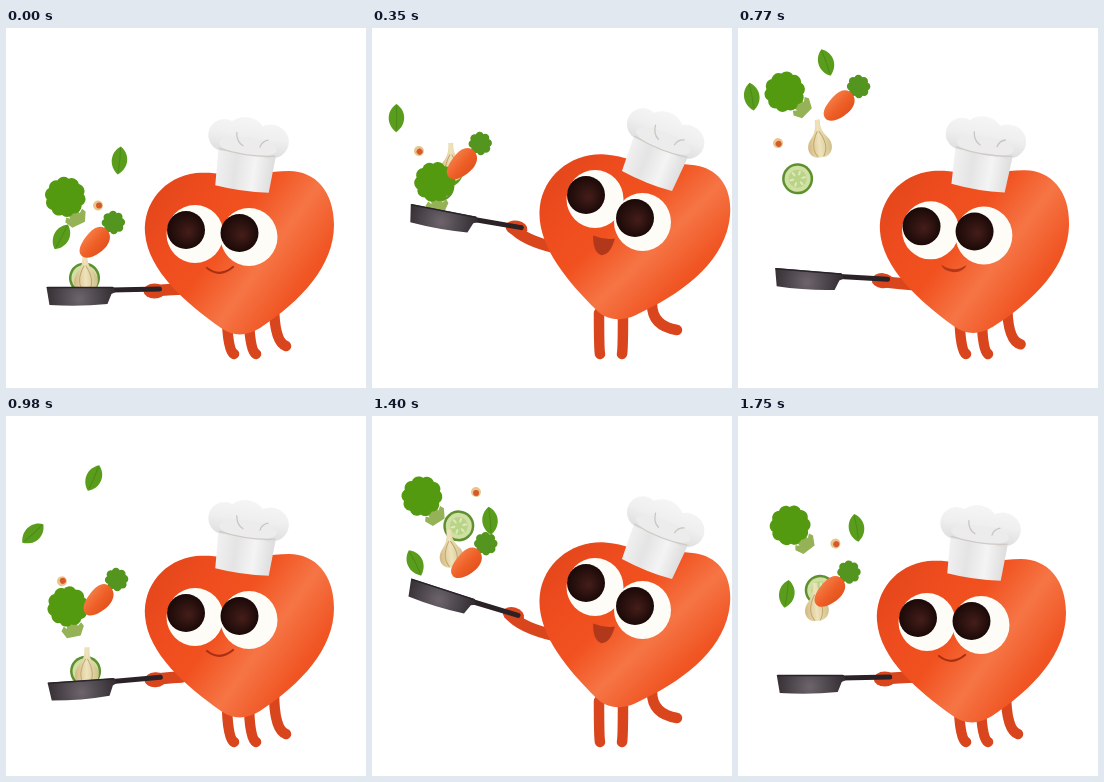
Animation of 360x360 px, one loop 1820 ms. Source, as an HTML page with a canvas:

```html
<!DOCTYPE html>
<html lang="en">
<head>
<meta charset="utf-8">
<title>Heart chef</title>
<style>
html, body { margin: 0; width: 100%; height: 100%; overflow: hidden; background: #fff; }
canvas { display: block; width: 360px; height: 360px; }
</style>
</head>
<body>
<canvas id="stage" width="360" height="360"></canvas>
<script>
const ctx = document.getElementById('stage').getContext('2d');
const LOOP = 1820, STEP = 70, TOSS = LOOP / 2, LAUNCH = 280, RISE = 240;

const mix = (a, b, k) => a + (b - a) * k;
const clamp = v => Math.min(1, Math.max(0, v));
function smooth(from, to, t) {
  const u = clamp((t - from) / (to - from));
  return u * u * (3 - 2 * u);
}

function at(x, y, degrees, draw) {
  ctx.save();
  ctx.translate(x, y);
  ctx.rotate(degrees * Math.PI / 180);
  draw();
  ctx.restore();
}

function oval(x, y, rx, ry, fill) {
  ctx.beginPath();
  ctx.ellipse(x, y, rx, ry, 0, 0, 7);
  ctx.fillStyle = fill;
  ctx.fill();
}

function shape(d, fill) {
  ctx.fillStyle = fill;
  ctx.fill(new Path2D(d));
}

function line(d, color, width) {
  ctx.strokeStyle = color;
  ctx.lineWidth = width;
  ctx.lineCap = ctx.lineJoin = 'round';
  ctx.stroke(new Path2D(d));
}

function shade(gradient, ...colors) {
  colors.forEach((c, i) => gradient.addColorStop(i / (colors.length - 1), c));
  return gradient;
}

// The chef lifts the pan, flicks it and sinks back, twice per loop.
function poseAt(t) {
  const p = t % TOSS;
  const raise = smooth(70, 350, p) - smooth(560, 840, p);
  const windUp = smooth(0, 210, p) - smooth(210, 420, p);
  const flick = smooth(210, 400, p) - smooth(630, 840, p);
  const angle = 18 * flick - 15 * windUp, rad = angle * Math.PI / 180;
  const x = 152 + 4.5 * Math.cos(2 * Math.PI * (p - 100) / TOSS), y = 261 - 61 * raise;
  return {
    lean: smooth(70, 210, p) - smooth(490, 840, p),
    hop: p < 140 ? -5 * Math.sin(Math.PI * p / 140) : 0,
    open: raise,
    angle, x, y, cos: Math.cos(rad), sin: Math.sin(rad)
  };
}

// ---- Food ----
function leaf() {
  shape('M-14 1C-8 -10 6 -11 14 -1C8 9 -6 11 -14 1Z', '#5a9d1c');
  line('M-12 1Q0 -1 11 -1', '#4b8a18', 1);
}

function florets(radius, count, color) {
  oval(0, 0, radius * .8, radius * .78, color);
  for (let i = 0; i < count; i++) {
    const a = i * 2 * Math.PI / count;
    oval(Math.cos(a) * radius * .67, Math.sin(a) * radius * .65, radius * .36, radius * .36, color);
  }
}

function broccoli() {
  shape('M-5 10L5 10L6 21L10 18L12 22L7 31L-7 31L-11 23L-8 19L-5 22Z', '#95b257');
  florets(20, 10, '#549a10');
}

function carrot() {
  at(0, -28, 0, () => florets(11.5, 8, '#53951f'));
  shape('M-3 -18C8 -20 13 -9 10 3C8 13 3 19 -2 18C-9 17 -11 6 -11 -4C-11 -12 -8 -17 -3 -18Z',
    shade(ctx.createLinearGradient(-11, 0, 11, 0), '#f57a43', '#ee6028', '#e4521d'));
}

function cucumber() {
  oval(0, 0, 15.5, 15.5, '#5f9030');
  oval(0, 0, 13, 13, '#cfe0a2');
  oval(0, 0, 9, 9, '#b9d488');
  for (let i = 0; i < 6; i++) at(0, 0, i * 60, () => oval(6, 0, 2.6, 1.1, '#dceab8'));
}

function garlic() {
  shape('M-2 -24L3 -24C2 -14 5 -10 10 -4C15 4 11 13 3 14L-4 14C-12 12 -14 3 -9 -4C-4 -10 -2 -14 -2 -24Z',
    shade(ctx.createLinearGradient(-12, 0, 12, 0), '#d2b77f', '#eee3bc', '#d0c08b'));
  line('M-1 -12C-7 -2 -7 7 -3 13M1 -12C7 -2 7 7 3 13', '#c3a76c', 1);
}

function nut() {
  oval(0, 0, 5, 5, '#e7c68e');
  oval(1, 0, 3, 3, '#d7592a');
}

// Each item leaves its slot in the pan, hangs near a top point and drops back.
// The two tosses of a loop have their own top point and landing time.
function food(t, draw, { slot, delay, tilt, rock, tops }) {
  const pan = poseAt(t);
  const since = (t - LAUNCH - delay + LOOP) % LOOP, air = since % TOSS;
  const [topX, topY, land] = tops[Math.floor(since / TOSS)];
  const up = 1 - (1 - clamp(air / RISE)) ** 2;
  const down = clamp((air - RISE) / (land - RISE)) ** 4;
  const lift = up - down;
  const reach = 82 - slot;
  const x = mix(pan.x - reach * pan.cos, topX, lift);
  const y = mix(pan.y - reach * pan.sin - 11, topY, lift);
  at(x, y, tilt + rock * Math.sin(Math.PI * air / 700), draw);
}

function drawFood(t) {
  food(t, nut, { slot: 10, delay: -60, tilt: 0, rock: 90, tops: [[38, 109, 900], [104, 76, 755]] });
  food(t, leaf, { slot: 10, delay: 45, tilt: 130, rock: -60, tops: [[88, 33, 930], [122, 98, 740]] });
  food(t, leaf, { slot: -10, delay: -50, tilt: 128, rock: -65, tops: [[12, 63, 940], [43, 147, 740]] });
  food(t, cucumber, { slot: 5, delay: 0, tilt: 0, rock: 60, tops: [[58, 142, 690], [87, 109, 628]] });
  food(t, garlic, { slot: 6, delay: 0, tilt: 0, rock: -8, tops: [[82, 103, 690], [79, 137, 625]] });
  food(t, broccoli, { slot: -5, delay: 50, tilt: 0, rock: -50, tops: [[46, 57, 693], [48, 70, 635]] });
  food(t, carrot, { slot: 12, delay: 20, tilt: 40, rock: 5, tops: [[102, 71, 736], [95, 147, 650]] });
}

// ---- Chef ----
function pan() {
  line('M-50 1L-2 0', '#2a2226', 5);
  shape('M-115 -2L-48 -2L-46 3L-50 5L-54 15Q-82 18 -112 16Z',
    shade(ctx.createRadialGradient(-82, 10, 2, -82, 8, 36), '#6a6268', '#4c464d', '#322c30'));
  line('M-114 -1.5H-49', '#29232a', 1.5);
}

function hat() {
  shape('M-29 -38L29 -38L27 0Q0 3 -27 0Z',
    shade(ctx.createLinearGradient(-28, 0, 28, 0), '#f0f0f0', '#e4e4e4', '#f4f4f4', '#dedede'));
  const puff = shade(ctx.createLinearGradient(0, -74, 0, -32), '#f6f6f6', '#efefef', '#dcdcdc');
  oval(-25, -51, 16, 16, puff);
  oval(22, -51, 18, 17, puff);
  oval(-4, -54, 20, 18, puff);
  oval(0, -43, 29, 9, '#ececec');
  line('M-28 -37Q0 -32 28 -37', '#cfcbc4', 1.3);
  line('M-13 -55Q-12 -46 -5 -43M12 -44Q13 -50 19 -52', '#c9c6c0', 1.3);
}

function heart() {
  shape(`M0 -72C-12 -80 -30 -81 -44 -80C-76 -76 -97 -50 -95 -20C-92 18 -54 50 -19 75
    C-8 83 6 84 20 75C61 48 94 13 94 -28C94 -62 75 -82 49 -82C29 -82 14 -78 0 -72Z`,
    shade(ctx.createLinearGradient(-95, -55, 85, 75),
      '#e3471b', '#ee4c1e', '#f1511f', '#f67545', '#f05523', '#e2451a'));
}

function eye(x, y, lookX) {
  oval(x, y, 28.5, 29, '#fefcf6');
  const px = x + lookX, py = y - 4;
  oval(px, py, 19, 19,
    shade(ctx.createRadialGradient(px + 3, py + 2, 1, px, py, 19), '#431c18', '#2e1310', '#1a0908'));
}

function mouth(open) {
  const sag = mix(10, 3, open), low = mix(10, 34, open), wide = mix(13, 11, open);
  if (open > .1) {
    shape(`M${-wide} 0Q0 ${sag} ${wide} 0Q${wide * .8} ${low * .5} 0 ${low * .54}
      Q${-wide * .8} ${low * .5} ${-wide} 0Z`, '#b2381b');
  } else {
    line(`M${-wide} 0Q0 ${sag} ${wide} -1`, '#a92f12', 2.2);
  }
}

function leg(hipX, hipY, footX, footY) {
  line(`M${hipX} ${hipY}Q${hipX} ${footY - 4} ${footX} ${footY}`, '#d9461e', 10.5);
}

function arm({ x, y, cos, sin, angle, lean }) {
  const handX = x - 10 * cos, handY = y - 10 * sin + 2;
  const shoulderX = mix(176, 184, lean), shoulderY = mix(261, 220, lean);
  line(`M${handX} ${handY}Q${handX + 10} ${mix(handY, shoulderY, .6)} ${shoulderX} ${shoulderY}`, '#d9461e', 11.5);
  at(handX + 3, handY, angle, () => oval(0, 0, 11, 7.5, '#d9461e'));
}

function drawScene(t) {
  const pose = poseAt(t), k = pose.lean;
  ctx.clearRect(0, 0, 360, 360);

  leg(mix(221, 227, k), 285, 228, 326);
  leg(mix(243, 251, k), 285, 250, 326);
  leg(mix(268, 280, k), 276, mix(280, 305, k), mix(318, 302, k));
  drawFood(t);
  arm(pose);
  at(pose.x, pose.y, pose.angle, pan);

  at(0, pose.hop, 0, () => {
    at(mix(234, 258, k), mix(225, 211, k), 8 * k, () => {
      ctx.transform(1, 0, -.06 * k, 1, 0, 0);
      heart();
    });
    eye(mix(189, 223, k), mix(206, 171, k), -9);
    eye(mix(243, 270.5, k), mix(209, 194, k), mix(-9.5, -7.5, k));
    at(mix(214, 232, k), mix(240, 209, k), 8 * k, () => mouth(pose.open));
    at(mix(236, 275, k), mix(161, 153, k), mix(8, 22, k), hat);
  });
}

function tick() {
  const t = performance.now() % LOOP;
  drawScene(Math.floor(t / STEP) * STEP);
  requestAnimationFrame(tick);
}
tick();
</script>
</body>
</html>
```
